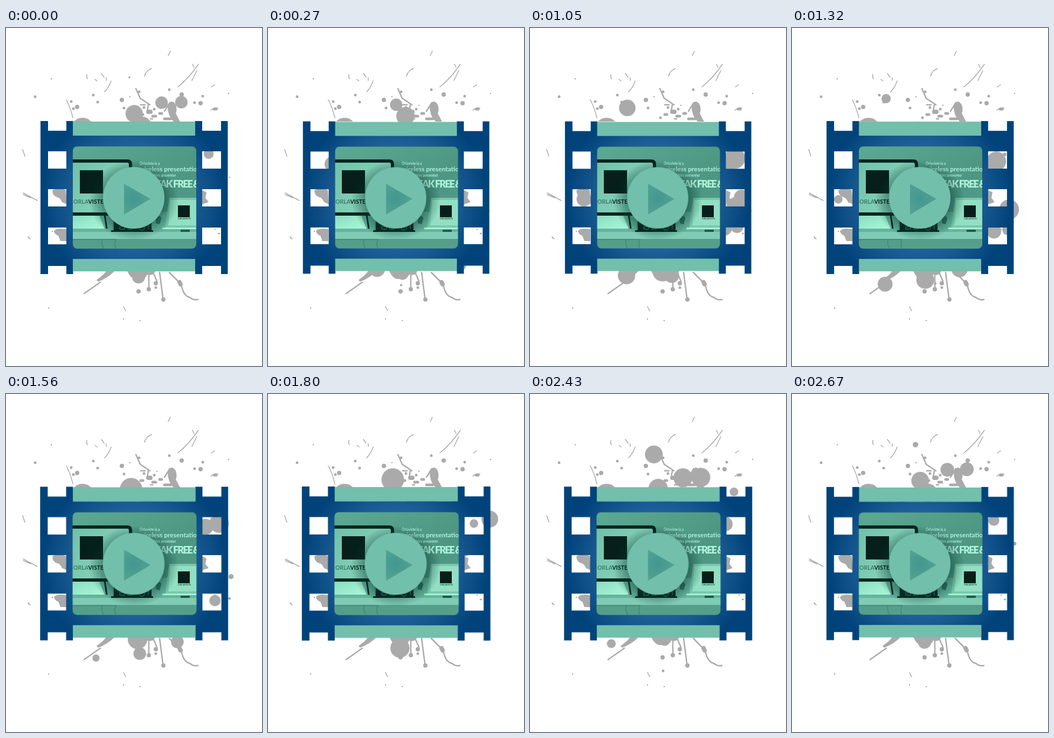
Animation, 475 px wide and 625 px high, one loop 2700 ms. Source, as an HTML page without scripts:

```html
<!DOCTYPE html>
<html lang="en">
<head>
<meta charset="utf-8">
<title>Film splash</title>
<style>
html, body { margin: 0; width: 100%; height: 100%; overflow: hidden; background: #fff; }
svg { display: block; width: 475px; height: 625px; }
.ink { fill: none; stroke: #aaa; stroke-linecap: round; stroke-linejoin: round; }
.ink .blob { fill: #aaa; stroke: none; }
.drops { fill: #aaa; }
.drops circle {
  transform-origin: 0 0;
  animation: fly 2700ms linear calc(var(--end) * 1ms - 2700ms) infinite;
}
.pulse { transform-origin: 237.5px 313.5px; animation: pulse 2700ms infinite; }
text { font-family: Lato, "Open Sans", sans-serif; font-weight: 700; fill: #b0f3dc; }
.loud { font-size: 18px; font-weight: 900; letter-spacing: -1.9px; }

/* Each drop leaves the centre, reaches (--x, --y) and vanishes at --end ms */
@keyframes fly {
  0% { transform: translate(calc(var(--x) * .1px), calc(var(--y) * .1px)); }
  75% { transform: translate(calc(var(--x) * .775px), calc(var(--y) * .775px)); }
  89% { transform: translate(calc(var(--x) * .9px), calc(var(--y) * .9px)) scale(.8); }
  97% { transform: translate(calc(var(--x) * .973px), calc(var(--y) * .973px)) scale(.4); }
  100% { transform: translate(calc(var(--x) * 1px), calc(var(--y) * 1px)) scale(0); }
}
@keyframes pulse {
  0%, 50%, 100% { transform: scale(1); animation-timing-function: ease-out; }
  25% { transform: scale(.992); animation-timing-function: ease-in; }
  75% { transform: scale(1.008); animation-timing-function: ease-in; }
}
</style>
</head>
<body>
<svg viewBox="0 0 475 625">
  <defs>
    <radialGradient id="navy" gradientUnits="userSpaceOnUse" cx="237.5" cy="313.5" r="172">
      <stop offset=".45" stop-color="#2767a3"/>
      <stop offset=".7" stop-color="#17588f"/>
      <stop offset="1" stop-color="#00437a"/>
    </radialGradient>
    <radialGradient id="shade">
      <stop offset=".65" stop-color="#04382f" stop-opacity=".5"/>
      <stop offset="1" stop-color="#04382f" stop-opacity="0"/>
    </radialGradient>
    <radialGradient id="arrow" gradientUnits="userSpaceOnUse" cx="237" cy="315" r="34">
      <stop offset="0" stop-color="#429792"/>
      <stop offset="1" stop-color="#56a490"/>
    </radialGradient>
    <linearGradient id="wall" x2="1" y2="1">
      <stop offset="0" stop-color="#5caa94"/>
      <stop offset=".6" stop-color="#4d9682"/>
      <stop offset="1" stop-color="#57a38d"/>
    </linearGradient>
    <linearGradient id="screen" x2="1" y2=".6">
      <stop offset="0" stop-color="#6fbfa7"/>
      <stop offset="1" stop-color="#8bd6bd"/>
    </linearGradient>
    <linearGradient id="paper" x2="1" y2="1">
      <stop offset="0" stop-color="#8adcbf"/>
      <stop offset="1" stop-color="#a9f7d9"/>
    </linearGradient>
  </defs>

  <g class="ink">
    <path stroke-width="8" d="M132 146h0M215 133h0M326 123h0M361 139h0M265 483h0M278 472h0M292 502h0M322 470l2 4M246 487h0M264 155h4"/>
    <path stroke-width="5" d="M121 136h0M162 124h0M170 137h0M125 149h0M219 148h0M350 138h0M365 126h0M303 114h0M247 118h0M278 480h0M54 127h0M386 150h3M250 160h4M256 147h0M275 150h0M272 163h6M285 158h4M242 166h0M294 168h12"/>
    <path stroke-width="2.5" d="M84 94h0M413 121h0M42 388h0M79 518h0M218 538h0M249 541h0M230 127h0M410 338h0M394 380h2M388 372h0M86 376h0M250 142h8M280 143h0M268 168h4"/>
    <path stroke-width="1.500" d="M112 133Q120 148 124 166M357 67Q340 92 319 109M345 97l9-18M150 86q-1 4 1 8M186 92v5M195 98q-4 12-12 20M270 75q-10 3-13 14M177 84l5 7M305 43l-4 8M346 67l3 6M32 305l26 14M32 308l14 6M165 95l4 3M380 152q7-6 13-4l-2 4M218 515l4 8M387 105l-6 4M31 225l4 12M41 386l4 4"/>
    <path stroke-width="2.500" d="M241 112l8 18 18 12M264 142l-2 12M273 452l7 16M285 452l6 46M265 455v26M303 452l18 18M326 478q4 18 15 20 7 6 15 4M304 138l-10 16M145 491l30-21"/>
    <path class="blob" d="M126 173q10-11 26-5l6 5zM300 142q8-12 15 0 3 10 0 16l8 15h-12q-12-12-11-31zM225 449h52q-3 10-15 7-8 14-18 8-12 2-19-15zM168 466q14-10 18-17h16q-14 14-31 20z"/>
    <path class="blob" d="M86 300q14-7 25 0l2 26-9-4q-4-9-9-9-9-3-9-13zM112 372q-20-3-23 4 2 6 8 8l4 10h11zM364 300l8 4-2 10 6 8-12 4z"/>
  </g>

  <g class="drops" transform="translate(237 313)">
    <circle r="21" style="--x:-8;--y:-223;--end:20"/>
    <circle r="20" style="--x:55;--y:-186;--end:180"/>
    <circle r="20" style="--x:94;--y:-187;--end:180"/>
    <circle r="18" style="--x:1;--y:-184;--end:480"/>
    <circle r="17" style="--x:24;--y:-200;--end:1020"/>
    <circle r="18" style="--x:-65;--y:-190;--end:1440"/>
    <circle r="18" style="--x:203;--y:-95;--end:2220"/>
    <circle r="18" style="--x:150;--y:-76;--end:1900"/>
    <circle r="24" style="--x:159;--y:-80;--end:1350"/>
    <circle r="24" style="--x:183;--y:25;--end:1600"/>
    <circle r="20" style="--x:170;--y:0;--end:1300"/>
    <circle r="15" style="--x:164;--y:75;--end:1800"/>
    <circle r="13" style="--x:180;--y:66;--end:1600"/>
    <circle r="14" style="--x:150;--y:-140;--end:2600"/>
    <circle r="15" style="--x:149;--y:-86;--end:200"/>
    <circle r="14" style="--x:179;--y:-37;--end:20"/>
    <circle r="16" style="--x:138;--y:145;--end:720"/>
    <circle r="15" style="--x:-146;--y:-76;--end:850"/>
    <circle r="16" style="--x:-158;--y:4;--end:1450"/>
    <circle r="15" style="--x:10;--y:164;--end:300"/>
    <circle r="15" style="--x:11;--y:158;--end:750"/>
    <circle r="16" style="--x:-42;--y:161;--end:800"/>
    <circle r="19" style="--x:12;--y:179;--end:1760"/>
    <circle r="17" style="--x:29;--y:161;--end:1350"/>
    <circle r="18" style="--x:10;--y:201;--end:2460"/>
    <circle r="17" style="--x:-72;--y:180;--end:1640"/>
    <circle r="17" style="--x:88;--y:158;--end:1800"/>
    <circle r="15" style="--x:-91;--y:157;--end:2590"/>
  </g>

  <g>
    <path fill="url(#wall)" d="M118 214h241v199H118z"/>
    <path fill="#66b49d" d="M118 347h80v30h-80zM270 340h89v37h-89z"/>
    <path fill="#7fcbb3" d="M118 377h241v13H118z"/>
    <path fill="#559f8a" d="M118 390h241v23H118z"/>
    <path fill="none" stroke="#468c79" stroke-width="2" d="M118 391h86q-4 8 0 18M178 391q-2 10 4 18"/>
    <path fill="url(#paper)" d="M118 347h55l10 24h-65z"/>
    <path fill="none" stroke="#06251f" stroke-width="3" d="M183 345l4 26"/>
    <path fill="url(#screen)" stroke="#06251f" stroke-width="6" d="M116 246h109q6 0 6 6v85q0 7-7 7H116z"/>
    <path fill="#061f1a" d="M137 263h43v43h-43z"/>
    <text x="181" y="324.500" text-anchor="end" font-size="10.500"><tspan fill="#3c7f6e">ORLA</tspan><tspan fill="#061f1a">VISTE</tspan></text>
    <text x="248" y="253" font-size="6.500">Orlaviste is a</text>
    <text x="247" y="265" font-size="12">wireless presentation</text>
    <text x="264" y="275" font-size="6.500">enables presenter</text>
    <text class="loud" x="345" y="295" text-anchor="end">BREAK FREE</text>
    <text class="loud" x="347" y="295">&amp;</text>
    <path fill="#7ac7ae" d="M303 314h56v58h-64z"/>
    <path fill="#92dfc4" d="M305 318h54v47h-58z"/>
    <path fill="#061f1a" d="M319 328h22v22h-22z"/>
    <text x="331" y="354" font-size="4.500" text-anchor="middle" style="fill:#1b5145">ORLAVISTE</text>
    <path fill="#a4f3d4" d="M290 369h69v3h-69z"/>
    <path fill="#1f5a4d" d="M324 373h17v4h-17z"/>
    <path fill="#2f7263" d="M278 349q10-4 10 4l-3 10-7-2z"/>
    <path fill="#06251f" d="M200 355h70v19h3v3h-78v-3h5z"/>
    <path fill="none" stroke="#4e9884" d="M211 367h9v5h-9zM226 367h8v5h-8zM247 370a5 4 0 1 0 10 0 5 4 0 1 0-10 0M264 360v12"/>
  </g>

  <g class="pulse">
    <ellipse cx="237" cy="318" rx="83" ry="74" fill="url(#shade)"/>
    <path fill="url(#navy)" fill-rule="evenodd" d="M64 172H78V190H112V172H124.500V199H351V172H364V190H399V172H411.500V455H399V440H364V455H351V427H124.500V455H112V440H78V455H64Z
      M78 228h34v32H78zM78 298h34v32H78zM78 369h34v31H78zM364 228h35v32h-35zM364 298h35v32h-35zM364 369h35v31h-35z
      M132 219H345a8 8 0 0 1 8 8V400a8 8 0 0 1-8 8H132a8 8 0 0 1-8-8V227a8 8 0 0 1 8-8z"/>
    <path fill="#72bfab" d="M124.500 173H351v26H124.500zM124.500 427H351v23H124.500z"/>
    <circle cx="237" cy="314" r="57" fill="#72bfab"/>
    <path fill="url(#arrow)" d="M219 288v57l49-29z"/>
  </g>
</svg>
</body>
</html>
```
